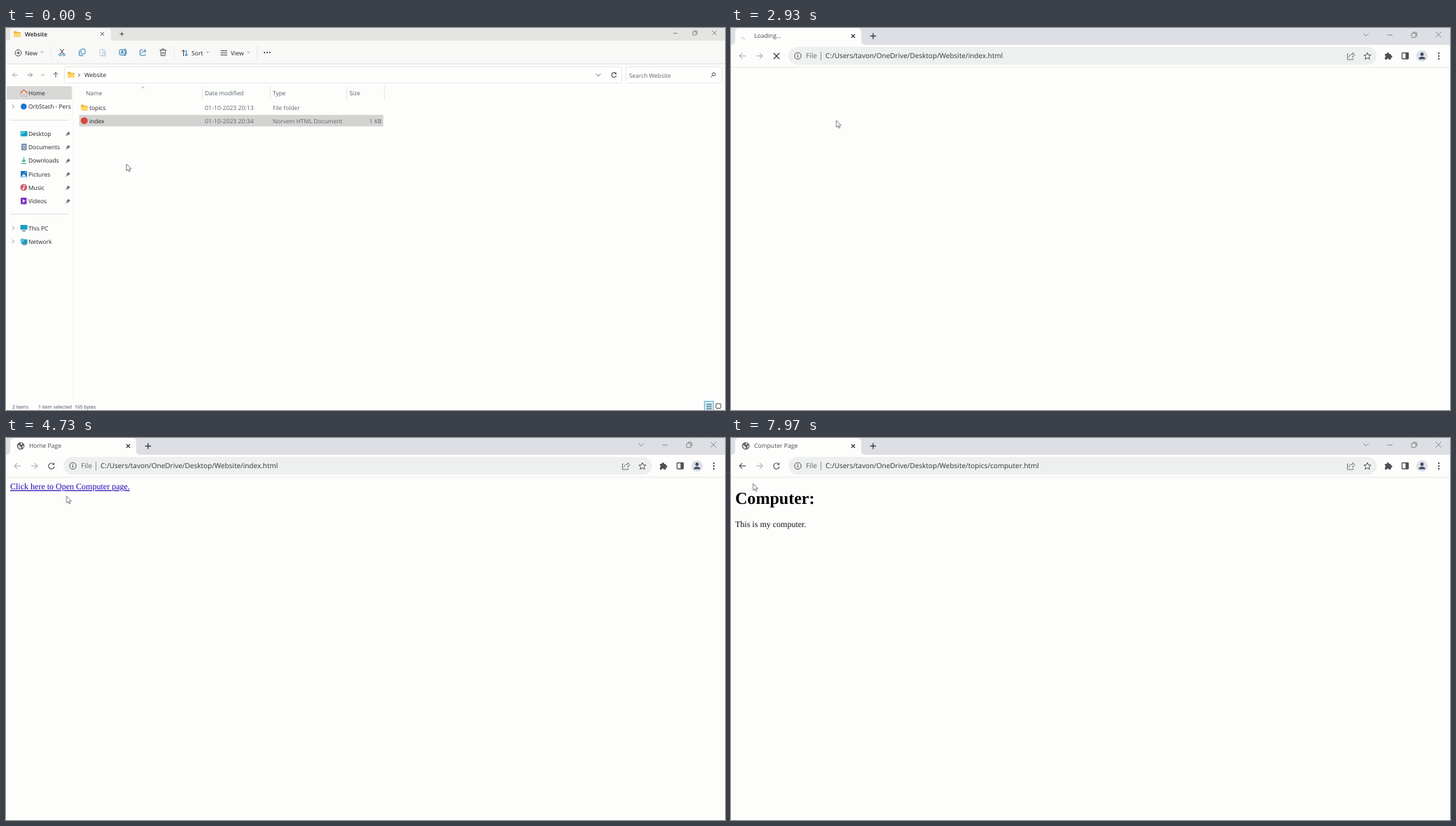
Recreate the animation shown at these times as an HTML page. Size 1027 by 545 pixels, loop 8 s.

```html
<!DOCTYPE html>
<html lang="en">
<head>
<meta charset="utf-8">
<title>Opening a local website</title>
<style>
  html, body { margin: 0; width: 100%; height: 100%; overflow: hidden; background: #fdfdfc; }
  svg { display: block; }
  text { font: 8.4px "Open Sans", sans-serif; fill: #222; white-space: pre; text-rendering: geometricPrecision; }
  .grey text, text.grey { fill: #666; }
  .head text { fill: #55606f; }
  .menu text { font-size: 8.6px; }
  .date text { font-size: 8.7px; }
  .status text { font-size: 6.8px; fill: #3b4657; }
  .title { font-size: 8.6px; fill: #44474b; }
  .url { font-size: 10px; fill: #303236; }
  .page text { font: 12.03px "Liberation Serif", serif; fill: #111; }
  .page .h1 { font-size: 24.06px; font-weight: bold; fill: #000; }
  .page .link { fill: #1a00b4; text-decoration: underline; }
  .line { fill: none; stroke: var(--ink, #444); stroke-width: var(--w, 1); }
  .line, .line * { vector-effect: non-scaling-stroke; }
  .blue { --ink: #2577b5; }
  .thin { --w: .75; --ink: #666; }
  .bold { --w: 1.4; --ink: #3c4043; }

  .row, .browser, .load, .home, .computer, .hover, .arrow, .hand, .beam, .cursor {
    animation: 8s step-end infinite;
  }
  .row { animation-name: row; }
  .browser { animation-name: open; animation-timing-function: ease-out; transform-origin: 513px 272px; }
  .load { animation-name: load; }
  .home { animation-name: home; }
  .computer { animation-name: computer; }
  .hover, .hand { animation-name: hover; }
  .arrow { animation-name: arrow; }
  .beam { animation-name: beam; }
  .cursor { animation-name: move; animation-timing-function: ease-in-out; }
  .spin { animation: spin 1s linear infinite; transform-origin: 20.5px 11px; }

  @keyframes row {
    0% { fill: #d3d3d2; stroke: #d3d3d2; }
    12%, 100% { fill: #cbe6f8; stroke: #a9d5f2; }
  }
  @keyframes open {
    0%, 33.9% { opacity: 0; transform: scale(.86); }
    36.5%, 100% { opacity: 1; transform: none; }
  }
  @keyframes load { 0% { visibility: visible; } 44%, 100% { visibility: hidden; } }
  @keyframes home { 0% { visibility: hidden; } 44% { visibility: visible; } 74%, 100% { visibility: hidden; } }
  @keyframes computer { 0% { visibility: hidden; } 74%, 100% { visibility: visible; } }
  @keyframes hover { 0% { visibility: hidden; } 61% { visibility: visible; } 74%, 100% { visibility: hidden; } }
  @keyframes beam { 0% { visibility: hidden; } 74% { visibility: visible; } 93.7%, 100% { visibility: hidden; } }
  @keyframes arrow { 0% { visibility: visible; } 61% { visibility: hidden; } 93.7%, 100% { visibility: visible; } }
  @keyframes move {
    0%, 4% { transform: translate(172px, 194px); }
    14.5%, 18% { transform: translate(137px, 126px); }
    26%, 51% { transform: translate(150.5px, 132px); }
    58.6%, 59.4% { transform: translate(86.5px, 83px); }
    62%, 75% { transform: translate(76px, 73px); }
    82.5%, 87% { transform: translate(46px, 90px); }
    97%, 100% { transform: translate(31.5px, 65px); }
  }
  @keyframes spin { from { transform: rotate(-153deg); } to { transform: rotate(207deg); } }
</style>
</head>
<body>
<svg width="1027" height="545" viewBox="0 0 1027 545">
  <defs>
    <g id="folder">
      <path d="M0 1.2Q0 0 1 0H3.6L5 1.4H9Q10 1.4 10 2.4V7Q10 8 9 8H1Q0 8 0 7Z" fill="#e8b43a"/>
      <path d="M0 3H10V7Q10 8 9 8H1Q0 8 0 7Z" fill="#ffd968"/>
    </g>
    <g id="pin">
      <path d="M3.4 0L6.4 3L5.2 3.4L3.8 5L3.5 6L.5 3L1.5 2.7L3 1.2Z" fill="#6c7177"/>
      <path d="M2 4.4L0 6.5" class="line"/>
    </g>
    <path id="down" d="M-1.8 -.9L0 .9L1.8 -.9" class="line"/>
    <path id="expand" d="M-1.6 -2.6L1.2 0L-1.6 2.6" class="line"/>
    <path id="close" d="M-3 -3L3 3M3 -3L-3 3" class="line"/>
    <path id="plus" d="M-3 0H3M0 -3V3" class="line"/>
    <g id="restore" class="line">
      <rect x="-3" y="-1.8" width="5" height="5" rx="1"/><path d="M-1.5 -3H2Q3.3 -3 3.3 -1.7V1.8"/>
    </g>
    <path id="left" d="M4.5 0H-4.5M-.5 -4L-4.5 0L-.5 4" fill="none" stroke-width="1.2"/>
    <g id="globe">
      <circle r="5.4" fill="#5f6368"/>
      <path d="M-4.3 -1.2Q-1 -.8 -.6 1.2L1 2.2L.2 4.3Q-3.8 3.8 -4.3 -1.2ZM.4 -4.3L2.7 -3.5L1.7 -1.8L-.4 -1.7ZM2 .2L4.4 -.5Q4.4 2 3 3.1Z" fill="#e6e8e9"/>
    </g>
    <g id="reload" class="line" style="--ink:#4e5257;--w:1.2">
      <path d="M3.3 -2.7A4.2 4.2 0 1 0 4.1 1"/><path d="M4.2 -5V-1.4H.6Z" fill="#4e5257" stroke="none"/>
    </g>
    <clipPath id="side"><rect y="80" width="94" height="460"/></clipPath>
  </defs>

  <!-- File manager -->
  <g>
    <rect width="1027" height="545" fill="#fdfdfc"/>
    <rect width="1027" height="18" fill="#e4e4e3"/>
    <rect y="18" width="1027" height="33" fill="#f8f8f7"/>
    <path d="M3 18Q6 18 6 15V4Q6 0 10 0H146Q150 0 150 4V15Q150 18 153 18Z" fill="#f8f8f7"/>
    <path d="M0 51.2H1027" stroke="#dededd"/>
    <use href="#folder" x="11" y="4.5"/>
    <text x="27" y="12" style="font-weight:600;font-size:8.3px">Website</text>
    <use href="#close" transform="translate(137.5 8.5) scale(.8)"/>
    <use href="#plus" x="165.5" y="8.5"/>
    <g class="thin">
      <path d="M953 7.5H959" class="line"/>
      <use href="#restore" x="984" y="7"/>
      <use href="#close" x="1012" y="7"/>
    </g>

    <g class="menu">
      <circle cx="17.5" cy="35.5" r="4.5" class="line"/><use href="#plus" transform="translate(17.5 35.5) scale(.75)"/>
      <text x="27" y="39">New</text><text x="265" y="39">Sort</text><text x="321" y="39">View</text>
      <g class="thin"><use href="#down" x="51.5" y="34.5"/><use href="#down" x="288" y="34.5"/><use href="#down" x="346.5" y="34.5"/></g>
      <path d="M64.5 25V45M240.5 25V45M358.5 25V45" stroke="#e9e9e8"/>
      <path d="M77.5 30L82 37M82.5 30L78 37" class="line"/>
      <g class="line blue"><circle cx="77.3" cy="38.2" r="1.6"/><circle cx="82.7" cy="38.2" r="1.6"/></g>
      <g class="line blue">
        <rect x="107" y="30" width="6" height="7" rx="1.3"/><path d="M106 32Q104.5 32 104.5 33.5V38Q104.5 39.5 106 39.5H110"/>
        <rect x="162" y="31" width="9.5" height="7.5" rx="1.3"/><path d="M164 37L166 32L168 37M164.8 35.3H167.2M170 29.5V40"/>
        <path d="M195 31H192.5Q191.5 31 191.5 32V38Q191.5 39 192.5 39H198Q199 39 199 38V37M194 36Q194.5 32.7 199.5 32.7M197.3 30.2L200 32.7L197.3 35.2"/>
      </g>
      <g class="line" style="--ink:#b5c8d8"><rect x="134" y="31" width="7" height="8.5" rx="1"/><path d="M136 30.5H139M138 34H142V40H138Z"/></g>
      <path d="M219.5 31.5H229M222.5 31.5Q222.5 29.5 224.3 29.5Q226 29.5 226 31.5M220.7 31.5L221.5 39.5H227L228 31.5M223.3 34V37.5M225.3 34V37.5" class="line" style="--w:.9"/>
      <path d="M253.5 40V31.5M251 34L253.5 31.5L256 34" class="line"/><path d="M257.5 31.5V40M255 37.5L257.5 40L260 37.5" class="line blue"/>
      <path d="M306.5 32.5H316M306.5 35.5H316M306.5 38.5H316" class="line"/>
      <g fill="#333"><circle cx="369.3" cy="35" r="1.1"/><circle cx="373" cy="35" r="1.1"/><circle cx="376.7" cy="35" r="1.1"/></g>
    </g>

    <g fill="#fefefd" stroke="#e7e7e6"><rect x="83.5" y="55.5" width="796" height="23" rx="1"/><rect x="885.5" y="55.5" width="137" height="23" rx="1"/></g>
    <use href="#left" transform="translate(13 67) scale(.8)" stroke="#9b9b9b"/>
    <use href="#left" transform="translate(34 67) scale(-.8 .8)" stroke="#808080"/>
    <use href="#down" transform="translate(52.5 67) scale(1.2)" class="thin"/>
    <use href="#left" transform="translate(71 67) rotate(90) scale(.8)" stroke="#444"/>
    <use href="#folder" x="88" y="62.5"/>
    <use href="#expand" transform="translate(104.5 67.3) scale(.8)"/>
    <text x="112" y="70">Website</text>
    <use href="#down" transform="translate(846 67) scale(1.8)" style="--w:.9"/>
    <use href="#reload" transform="translate(868.5 67) scale(.8)"/>
    <text x="890" y="70.5" class="grey">Search Website</text>
    <g class="line"><circle cx="1011" cy="66" r="2.2"/><path d="M1009.4 67.7L1006.8 70.3"/></g>

    <g clip-path="url(#side)">
      <rect x="1" y="83" width="93" height="19" fill="#d8d8d7"/>
      <path d="M22 92V97.5H24.3V94H26.7V97.5H29V92L25.5 89Z" fill="#f3e2d4" stroke="#a7a7a7" stroke-width=".6"/>
      <path d="M20.5 93L25.5 88.3L30.5 93" class="line" style="--ink:#cd6a35;--w:1.3"/>
      <text x="32" y="96">Home</text>
      <circle cx="25.3" cy="112" r="4.3" fill="#1676cf"/>
      <text x="32" y="115.3">OrbStash - Pers</text>
      <path d="M6 131.5H90M6 265.5H90" stroke="#dedede"/>
      <rect x="20.5" y="147" width="10" height="7.5" rx="1" fill="#169bc0"/><path d="M21 153.5L29.5 147.3H21Z" fill="#47c8d4"/>
      <text x="32" y="154">Desktop</text>
      <rect x="22" y="165" width="7.5" height="9.5" rx="1" fill="#748da8"/><path d="M23.5 167.5H28M23.5 169.7H28M23.5 172H28" stroke="#dce7f0" stroke-width=".9"/>
      <text x="32" y="173">Documents</text>
      <path d="M25.5 184.5V191M22.8 188.5L25.5 191L28.2 188.5M22 193.5H29" class="line" style="--ink:#20a977;--w:1.1"/>
      <text x="32" y="192.3">Downloads</text>
      <rect x="21" y="204" width="9" height="9" rx="1" fill="#1478c4"/><path d="M21.5 212.5L25.5 207.8L29.5 212.5Z" fill="#d9f2ff"/><circle cx="28" cy="206" r=".8" fill="#fff"/>
      <text x="32" y="211.5">Pictures</text>
      <circle cx="25.3" cy="227.5" r="4.8" fill="#cf5765"/><path d="M25.7 229.5V224.5L27.5 225.5" class="line" style="--ink:#fff"/><circle cx="24.5" cy="229.5" r="1.3" fill="#fff"/>
      <text x="32" y="230.8">Music</text>
      <rect x="21" y="242" width="8.5" height="9.5" rx="1" fill="#8038bf"/><path d="M24 244.5L27.7 246.8L24 249Z" fill="#fff"/>
      <text x="32" y="250">Videos</text>
      <use href="#pin" x="85.5" y="147.5"/><use href="#pin" x="85.5" y="166.7"/><use href="#pin" x="85.5" y="186"/>
      <use href="#pin" x="85.5" y="205.2"/><use href="#pin" x="85.5" y="224.4"/><use href="#pin" x="85.5" y="243.6"/>
      <g style="--ink:#888;--w:.9"><use href="#expand" x="10.5" y="112"/><use href="#expand" x="10.5" y="285.3"/><use href="#expand" x="10.5" y="304.5"/></g>
      <rect x="20.5" y="281" width="10" height="6.8" rx=".8" fill="#1a9fc4"/><path d="M23 289.5H28" stroke="#587686" stroke-width="1.2"/>
      <text x="32" y="288.5">This PC</text>
      <rect x="22" y="301.5" width="8.5" height="7" rx="1" fill="#1b98be"/><circle cx="23.3" cy="303" r="2.8" fill="#58b9cf"/><path d="M24 309.3H29" stroke="#587686"/>
      <text x="32" y="307.8">Network</text>
    </g>
    <path d="M95.5 80V530" stroke="#f4f4f3"/>

    <path d="M280.5 83V102M377.5 83V102M486.5 83V102M540.5 83V102" stroke="#e6e6e5"/>
    <use href="#down" transform="translate(195.5 85) scale(1 -1)" class="thin"/>
    <g class="head">
      <text x="114" y="96">Name</text><text x="284" y="96">Date modified</text><text x="381" y="96">Type</text><text x="490.5" y="96">Size</text>
    </g>
    <rect class="row" x="105" y="124.3" width="433.5" height="15.7" stroke-width=".8"/>
    <use href="#folder" x="107" y="109.5"/><circle cx="111.8" cy="132.3" r="4.9" fill="#d9483b"/>
    <text x="119" y="117">topics</text><text x="119" y="136">index</text>
    <g class="grey">
      <g class="date"><text x="284" y="117">01-10-2023 20:13</text><text x="284" y="136">01-10-2023 20:34</text></g>
      <text x="381" y="117">File folder</text><text x="381" y="136">Norvem HTML Document</text>
      <text x="536.5" y="136" text-anchor="end">1 KB</text>
    </g>
    <g class="status"><text x="9" y="542.5">2 items</text><text x="46" y="542.5">1 item selected</text><text x="98" y="542.5">165 bytes</text></g>
    <rect x="997.5" y="532.5" width="13" height="14" fill="#cbeaf5" stroke="#62b5d3"/>
    <path d="M1000.5 537H1008M1000.5 540H1008M1000.5 543H1008" class="line"/>
    <rect x="1014" y="536" width="7" height="6.5" rx="1" class="line"/>
  </g>

  <!-- Browser -->
  <g class="browser">
    <rect width="1027" height="545" fill="#fdfefc"/>
    <rect width="1027" height="24" fill="#dddfe4"/>
    <path d="M0 24Q6 24 6 18V6Q6 0 12 0H180Q186 0 186 6V18Q186 24 192 24Z" fill="#fdfefc"/>
    <path d="M0 56H1027" stroke="#e6e8e2"/>
    <g class="bold">
      <use href="#close" transform="translate(174.5 11.5) scale(.85)"/>
      <use href="#plus" transform="translate(203 11.5) scale(1.4)"/>
    </g>
    <g class="thin">
      <use href="#down" transform="translate(907 9.5) scale(2.1)"/>
      <path d="M937.5 10H945" class="line"/>
      <use href="#restore" transform="translate(975.7 9.7) scale(1.2)"/>
      <use href="#close" transform="translate(1010.5 9.5) scale(1.3)"/>
    </g>
    <rect x="82" y="27" width="840.5" height="25.5" rx="12.7" fill="#eef0f0"/>
    <use href="#left" transform="translate(40.5 39.8) scale(-1 1)" stroke="#b2b4b7"/>
    <circle cx="95.5" cy="39.8" r="4.7" class="line" style="--ink:#4d5156"/><path d="M95.5 39V42.3M95.5 37V38.2" class="line"/>
    <text x="107" y="43.3" class="url" style="fill:#62666b">File</text>
    <path d="M128.5 34V46" stroke="#8d9195"/>
    <path d="M882 37H880.5V45H888.5V43M882.5 42Q883 37.5 888 37.5V35L891 38.5L888 41.7V39.5" class="line" style="--ink:#62666b;--w:.9"/>
    <path d="M909 35L910.5 38.4L914 38.7L911.3 41.1L912.2 44.6L909 42.7L905.8 44.6L906.7 41.1L904 38.7L907.5 38.4Z" class="line" style="--ink:#4d5156"/>
    <path d="M934 37H936.7A1.7 1.7 0 1 1 940 37H942.5V39.2A1.6 1.6 0 1 1 942.5 42.3V45H939.8A1.6 1.6 0 0 0 936.6 45H934V42A1.6 1.6 0 0 0 934 39Z" fill="#4d5156"/>
    <rect x="958.5" y="35.5" width="9" height="8.5" rx=".8" class="line" style="--ink:#4d5156;--w:1.3"/><rect x="963.5" y="35.5" width="4" height="8.5" fill="#4d5156"/>
    <circle cx="987" cy="40" r="8.2" fill="#dce1ea"/><circle cx="987" cy="37.5" r="2.4" fill="#414b5d"/><path d="M982.3 44.5Q982.3 41 987 41Q991.7 41 991.7 44.5Z" fill="#414b5d"/>
    <g fill="#4d5156"><circle cx="1011" cy="36" r="1.2"/><circle cx="1011" cy="40" r="1.2"/><circle cx="1011" cy="44" r="1.2"/></g>

    <g class="load">
      <path class="spin line" d="M20.5 6A5 5 0 0 1 25.2 9.6" style="--ink:#b9c0d2"/>
      <text x="33" y="14" class="title">Loading...</text>
      <use href="#close" transform="translate(65 40) scale(1.4)" class="bold"/>
      <use href="#left" x="16.5" y="39.8" stroke="#b2b4b7"/>
      <text x="135" y="43.3" class="url">C:/Users/tavon/OneDrive/Desktop/Website/index.html</text>
    </g>
    <g class="home">
      <use href="#globe" x="21" y="11.3"/>
      <use href="#reload" x="65" y="40"/>
      <use href="#left" x="16.5" y="39.8" stroke="#b2b4b7"/>
      <text x="33" y="14" class="title">Home Page</text>
      <text x="135" y="43.3" class="url">C:/Users/tavon/OneDrive/Desktop/Website/index.html</text>
      <g class="page"><text class="link" x="6" y="73.4">Click here to Open Computer page.</text></g>
    </g>
    <g class="hover">
      <path d="M0 529.5H290Q294.5 529.5 294.5 534V545H0Z" fill="#dfe1e5" stroke="#c9cbcf"/>
      <text x="4" y="540.5" style="font-size:8.5px;fill:#55595e">file:///C:/Users/tavon/OneDrive/Desktop/Website/topics/computer.html</text>
    </g>
    <g class="computer">
      <use href="#globe" x="21" y="11.3"/>
      <use href="#reload" x="65" y="40"/>
      <use href="#left" x="16.5" y="39.8" stroke="#4e5257"/>
      <text x="33" y="14" class="title">Computer Page</text>
      <text x="135" y="43.3" class="url">C:/Users/tavon/OneDrive/Desktop/Website/topics/computer.html</text>
      <g class="page">
        <text class="h1" x="6" y="94.4">Computer:</text>
        <text x="6" y="127.4">This is my computer.</text>
      </g>
    </g>
  </g>

  <!-- Pointer -->
  <g class="cursor">
    <path class="arrow" d="M0 0V9.6L2.2 7.7L3.8 11L5.3 10.3L3.8 7.1H6.9Z" fill="#fff" stroke="#555" stroke-width=".8"/>
    <path class="hand" d="M-1 0Q0 -1 1 0V4L4.5 4.8Q6 5.2 6 6.8L5 11H0L-3.5 6.8Q-3 5.5 -1 7Z" fill="#fff" stroke="#444" stroke-width=".8"/>
    <path class="beam" d="M-2.5 -5H-.7L0 -4.4L.7 -5H2.5M0 -4.4V4.4M-2.5 5H-.7L0 4.4L.7 5H2.5" fill="none" stroke="#333" stroke-width=".9"/>
  </g>
</svg>
</body>
</html>
```
